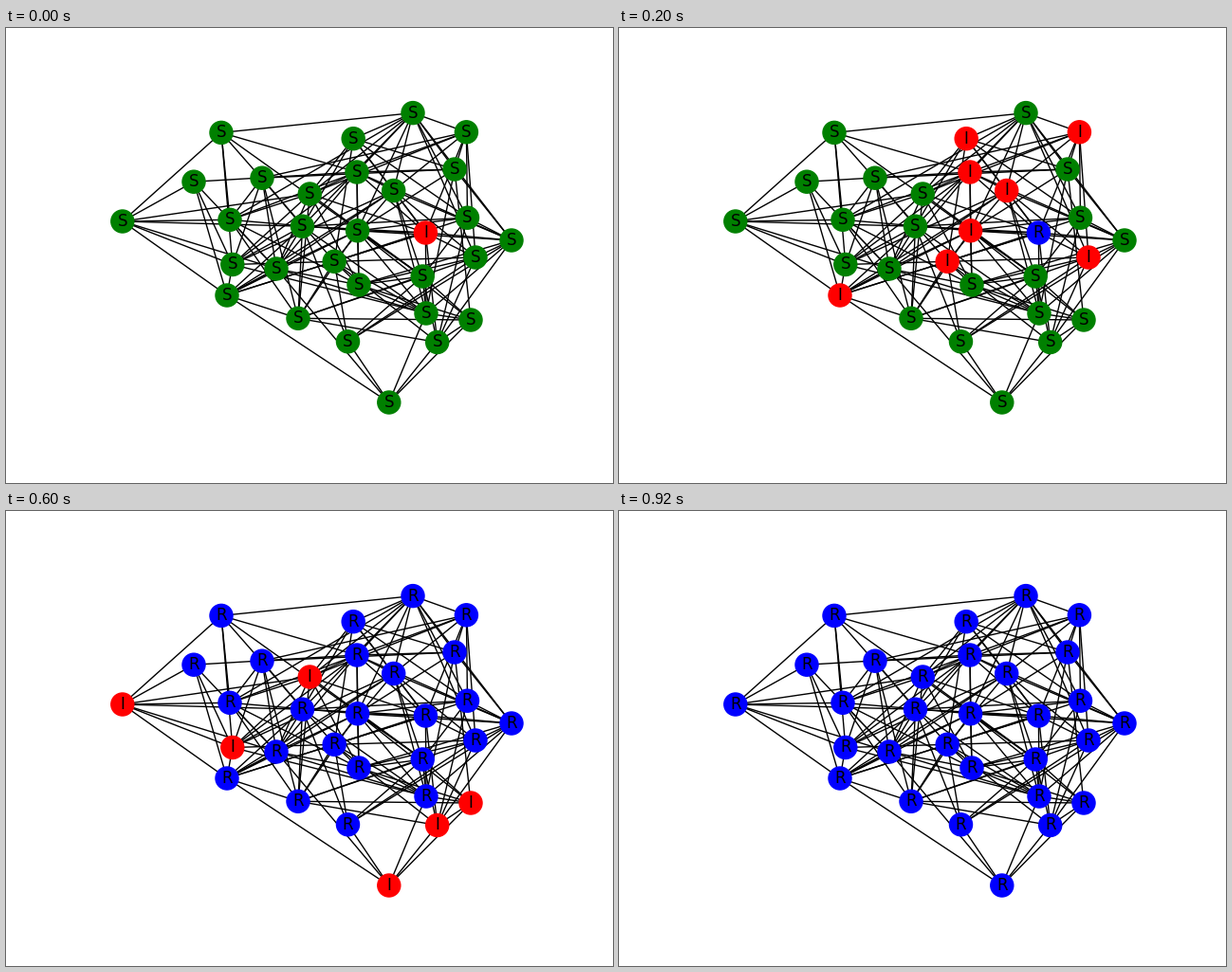
These frames come from a looping animation (640x480 px, 1 s). A matplotlib script:

```python
import matplotlib.pyplot as plt
from matplotlib.animation import FuncAnimation
from matplotlib.collections import LineCollection

WIDTH, HEIGHT, DPI = 640, 480, 100
COLORS = {"S": "green", "I": "red", "R": "blue"}

# name: (x, y, step of infection, neighbours not listed earlier)
NODES = {
    "a": (227, 110.4, 2, "odefmyw"),
    "b": (198, 162.2, 2, "dmfgh"),
    "c": (270, 158.2, 2, "qpefgij"),
    "d": (122.8, 204, 3, "ejkfgh"),
    "e": (236, 202.3, 2, "kmigvxo"),
    "f": (238.8, 249.5, 3, "hkmjwzn"),
    "g": (285, 254, 2, "kjnvhxDzm"),
    "h": (233, 282, 1, "Dijwvugn"),
    "i": (308, 306.3, 2, "ABvwjkyt"),
    "j": (312.5, 209.2, 2, "lorzCu"),
    "k": (320.3, 175, 3, "lopmxuy"),
    "l": (366.2, 116.7, 1, "onuqwr"),
    "m": (370, 152, 1, "onuqvpxs"),
    "n": (408.7, 171.5, 1, "oupstzwy"),
    "o": (429, 89.6, 2, "pqrsvt"),
    "p": (485.4, 109.8, 1, "qrtu"),
    "q": (473, 149, 2, "szAv"),
    "r": (486.5, 200.2, 2, "svByw"),
    "s": (533, 224, 2, "tuxzBCv"),
    "t": (495, 242, 1, "uxCBw"),
    "u": (442.4, 216, 0, "vwzB"),
    "v": (370.6, 213.8, 1, "yzAx"),
    "w": (346.2, 246.3, 1, "zxCB"),
    "x": (372, 271, 2, "zyA"),
    "y": (439.2, 262, 2, "zBAC"),
    "z": (443, 301, 2, "DA"),
    "A": (490, 308, 3, "BD"),
    "B": (454.7, 331.5, 3, "D"),
    "C": (360.5, 330.8, 2, "D"),
    "D": (403.8, 395, 3, ""),
}

points = {name: node[:2] for name, node in NODES.items()}
edges = [(points[name], points[other])
         for name, node in NODES.items() for other in node[3]]

fig = plt.figure(figsize=(WIDTH / DPI, HEIGHT / DPI), dpi=DPI, facecolor="white")
ax = fig.add_axes([0, 0, 1, 1])
ax.set_xlim(0, WIDTH)
ax.set_ylim(HEIGHT, 0)
ax.axis("off")

ax.add_collection(LineCollection(edges, colors="black", linewidths=1, zorder=1))
dots = ax.scatter(*zip(*points.values()), s=300, c="green", zorder=2)
labels = [ax.text(x, y, "S", size=12, family="DejaVu Sans",
                  ha="center", va="center", zorder=3)
          for x, y in points.values()]


def state_at(step, infected):
    if step < infected:
        return "S"
    return "I" if step == infected else "R"


def draw(step):
    states = [state_at(step, node[2]) for node in NODES.values()]
    colors = [COLORS[state] for state in states]
    dots.set_facecolor(colors)
    dots.set_edgecolor(colors)
    for label, state in zip(labels, states):
        label.set_text(state)
    return [dots, *labels]


animation = FuncAnimation(fig, draw, frames=5, interval=200, repeat=True,
                          repeat_delay=0)
plt.show()
```
